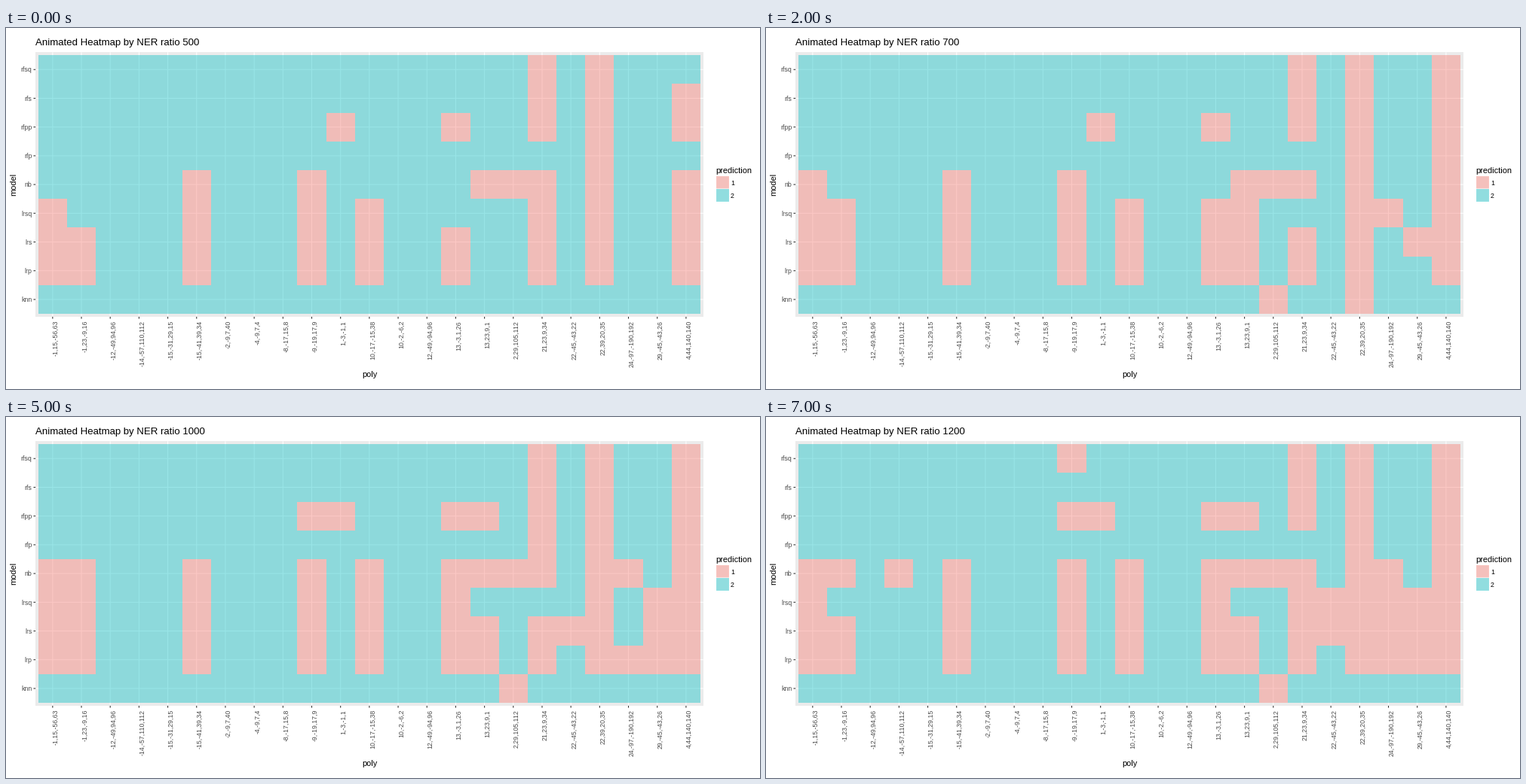
These frames come from a looping animation (1000 px wide and 480 px high, 8 s). A matplotlib script:

```python
import numpy as np
import matplotlib.pyplot as plt
from matplotlib.animation import FuncAnimation
from matplotlib.colors import ListedColormap
from matplotlib.patches import Rectangle

W, H, DPI = 1000, 480, 100
PX = 72 / DPI  # points per pixel
STROKE = 1.07 * PX
plt.rcParams["font.family"] = "Liberation Sans"

MODELS = ["rfsq", "rfs", "rfpp", "rfp", "nb", "lrsq", "lrs", "lrp", "knn"]
POLYS = [
    "-1,15,-56,63", "-1,23,-9,16", "-12,-49,94,96", "-14,-57,110,112",
    "-15,-31,29,15", "-15,-41,39,34", "-2,-9,7,40", "-4,-9,7,4",
    "-8,-17,15,8", "-9,-19,17,9", "1,-3,-1,1", "10,-17,-15,38",
    "10,-2,-6,2", "12,-49,-94,96", "13,-3,1,26", "13,23,9,1",
    "2,29,105,112", "21,23,9,34", "22,-45,-43,22", "22,39,20,35",
    "24,-97,-190,192", "29,-45,-43,26", "4,44,140,140",
]
PINK, TEAL, ALPHA = "#F8766D", "#00BFC4", 0.4

# Columns predicted as class 1 at the first ratio
LINEAR = {0, 1, 5, 9, 11, 14, 17, 19, 22}
START = dict(
    rfsq={17, 19}, rfs={17, 19, 22}, rfpp={10, 14, 17, 19, 22}, rfp={19},
    nb={5, 9, 15, 16, 17, 19, 22}, lrsq=LINEAR - {1, 14},
    lrs=LINEAR, lrp=LINEAR, knn=set(),
)
# Cells that flip class at each later ratio
GAPS = {4, 6, 7, 8, 10, 12, 13, 16}
FLIPS = [
    dict(rfsq={22}, rfp={22}, lrsq={1, 14}, lrs={15}, lrp={15}, knn={16}),
    dict(nb={0}, lrsq={15, 17, 20}, lrs={21}, knn={19}),
    dict(nb={1, 14}, lrsq={17, 20}, knn={19, 22}),
    dict(rfpp={2, 9}, lrs=GAPS | {18, 20}, lrp={16, 20}, knn={22}),
    dict(rfpp={2, 15}, rfp={17}, nb={11, 20}, lrsq={15, 17, 21},
         lrs=GAPS | {20}, lrp={16, 21}),
    dict(lrsq={15, 17, 18}, lrs=GAPS | {2, 3, 20}, lrp={16, 18, 20}, knn={3}),
    dict(rfsq={9}, rfp={17}, nb={3}, lrsq={1, 15, 20},
         lrs=GAPS | {2, 3}, lrp={16, 18, 20}, knn={3}),
]


def grid_at(step):
    grid = np.ones((len(MODELS), len(POLYS)), dtype=int)
    for change in [START] + FLIPS[:step]:
        for model, cols in change.items():
            grid[MODELS.index(model), list(cols)] ^= 1
    return grid


fig = plt.figure(figsize=(W / DPI, H / DPI), dpi=DPI, facecolor="white")
ax = fig.add_axes([0, 0, 1, 1])
ax.set(xlim=(0, W), ylim=(H, 0))
ax.axis("off")


def label(x, y, text, size, color="black", **kw):
    kw = dict(va="baseline", rotation_mode="anchor") | kw
    return ax.text(x, y, text, fontsize=size * PX, color=color, zorder=5, **kw)


def line(xs, ys, color, z):
    # Unsnapped, so lines between pixels are softened
    ax.plot(xs, ys, color=color, lw=STROKE, zorder=z, snap=False,
            solid_capstyle="butt")


def box(x0, y0, x1, y1, **kw):
    ax.add_patch(Rectangle((x0, y0), x1 - x0, y1 - y0, **kw))


# Panel, grid lines, ticks and tick labels
LEFT, RIGHT, TOP, BOTTOM = 39.2, 924.8, 32.3, 383.9
x_edges = np.linspace(42.75, 921, len(POLYS) + 1)
y_edges = np.linspace(36.15, 380.05, len(MODELS) + 1)
box(LEFT, TOP, RIGHT, BOTTOM, fc="#EBEBEB", lw=0, zorder=0)

for x, poly in zip((x_edges[:-1] + x_edges[1:]) / 2, POLYS):
    line([x, x], [TOP, BOTTOM], "white", 1)
    line([x, x], [BOTTOM, BOTTOM + 2.7], "#333333", 3)
    label(x + 6.9, 388.9, poly, 8.8, "#4D4D4D", ha="right", rotation=90)

for y, model in zip((y_edges[:-1] + y_edges[1:]) / 2, MODELS):
    line([LEFT, RIGHT], [y, y], "white", 1)
    line([LEFT - 2.7, LEFT], [y, y], "#333333", 3)
    label(34.3, y + 3.2, model, 8.8, "#4D4D4D", ha="right")

tiles = ax.pcolormesh(np.round(x_edges), np.round(y_edges), grid_at(0),
                      cmap=ListedColormap([PINK, TEAL]), vmin=0, vmax=1,
                      alpha=ALPHA, zorder=2)

# Titles and legend
title = label(39, 23, "", 13.2)
label(482, 464, "poly", 11, ha="center")
label(13, 208, "model", 11, ha="center", rotation=90)
label(941.5, 193, "prediction", 11)
for y, color, name in [(197, PINK, "1"), (214, TEAL, "2")]:
    box(942, y, 959, y + 17, fc="#F2F2F2", ec="white", lw=STROKE, snap=False)
    box(942, y, 959, y + 17, fc=color, alpha=ALPHA, lw=0)
    label(961, y + 12, name, 8.8)


def update(step):
    title.set_text(f"Animated Heatmap by NER ratio {500 + 100 * step}")
    tiles.set_array(grid_at(step))
    return title, tiles


anim = FuncAnimation(fig, update, frames=len(FLIPS) + 1, interval=1000,
                     repeat=True, repeat_delay=0)
plt.show()
```
